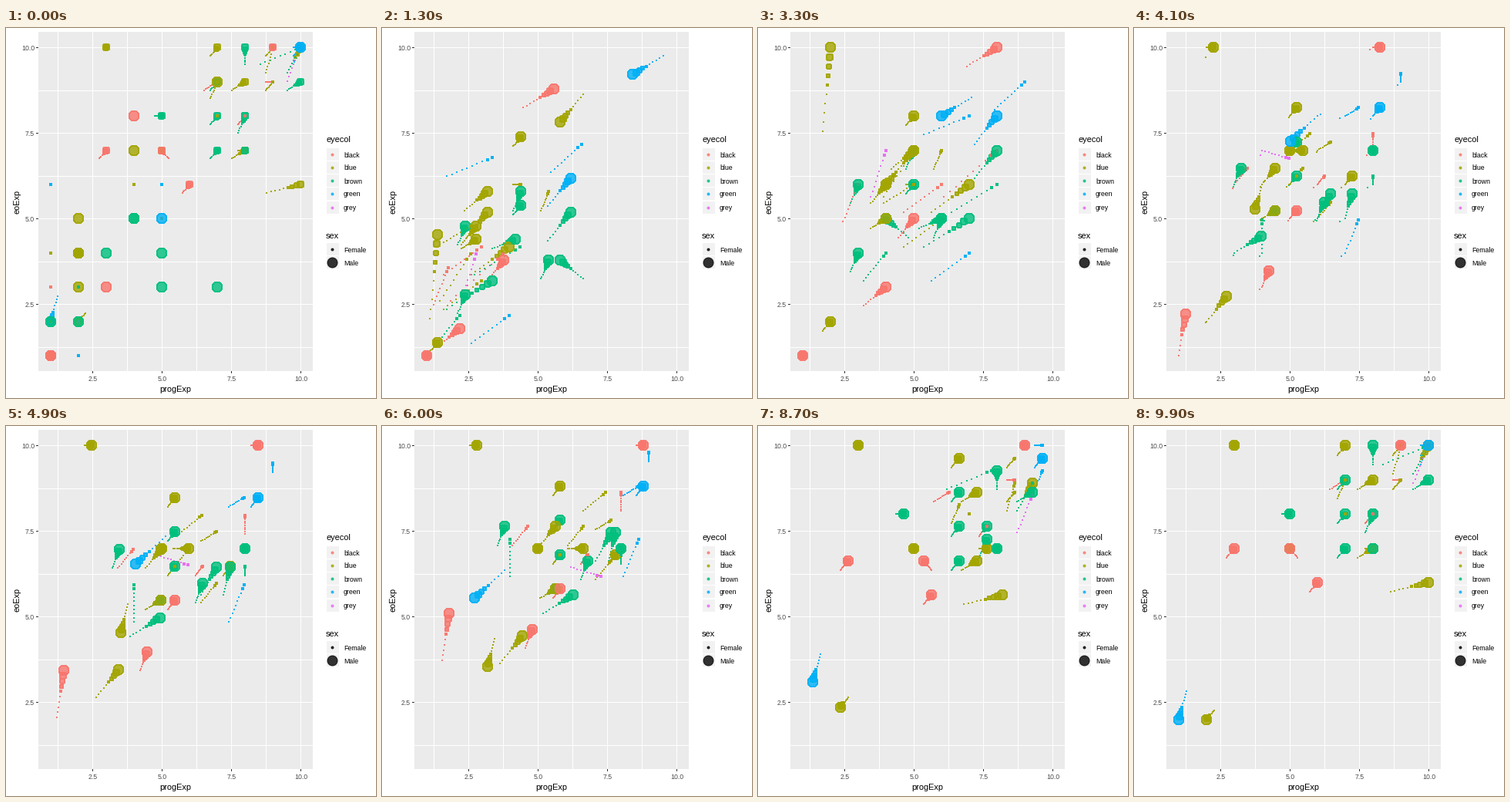
Write a matplotlib script that moves like this. It is 480 px wide and 480 px high and loops after 10000 ms.

```python
import numpy as np
import matplotlib.pyplot as plt
from matplotlib.animation import FuncAnimation
from matplotlib.patches import Rectangle

SIZE, FRAMES, STEP_MS = 480, 100, 100
WAKE = 9
FEMALE, MALE = 2, 6
ALPHA = 0.8
HUES = {"black": "#F8766D", "blue": "#A3A500", "brown": "#00BF7D",
        "green": "#00B0F6", "grey": "#E76BF3"}

plt.rcParams["font.family"] = "Liberation Sans"
fig = plt.figure(figsize=(SIZE / 72, SIZE / 72), dpi=72, facecolor="white")
ax = fig.add_axes([0, 0, 1, 1])
ax.set_xlim(0, SIZE)
ax.set_ylim(SIZE, 0)
ax.axis("off")


def px(v):
    return np.floor(22 + 36 * np.asarray(v) + 0.5)


def py(v):
    return np.floor(25.46 + 44.4 * (10 - np.asarray(v)) + 0.5)


def box(x, y, w, h, color):
    ax.add_patch(Rectangle((x, y), w, h, fc=color, lw=0, aa=False, zorder=1))


def label(x, y, s, size=8.8, color="black", **kw):
    ax.text(x, y, s, fontsize=size, color=color, va="baseline", **kw)


def radius(size):
    """Whole-pixel radius of a point of the given size in mm."""
    r = 0.375 * (size * 2.845 + 0.945)
    return np.maximum(1, np.floor(r + 0.5))


def dots(x, y, size, colors, zorder=3):
    area = (2 * radius(np.asarray(size, float)) - 1) ** 2
    return ax.scatter(x, y, s=area, c=colors, edgecolors=colors, alpha=ALPHA,
                      linewidths=1, antialiased=False, zorder=zorder)


# Panel, grid and axes
box(42, 5, 356, 440, "#EBEBEB")
for v in np.arange(1.25, 10.1, 1.25):
    box(px(v), 5, 1, 440, "white")
    box(42, py(v), 356, 1, "white")
for v in (2.5, 5.0, 7.5, 10.0):
    box(px(v), 445, 1, 3, "#333333")
    box(39, py(v), 3, 1, "#333333")
    label(px(v) + 0.5, 458, f"{v:.1f}", color="#4D4D4D", ha="center")
    label(37, py(v) + 4, f"{v:.1f}", color="#4D4D4D", ha="right")
label(220, 472, "progExp", 11, ha="center")
label(17, 225, "eoExp", 11, ha="center", rotation=90, rotation_mode="anchor")

# Legends
label(415, 148, "eyecol", 11)
for k, (name, hue) in enumerate(HUES.items()):
    y = round(163.6 + 17.28 * k)
    box(416, y - 8, 16, 16, "#F2F2F2")
    dots([423], [y], [1.5], [hue])
    label(438, y + 3.5, name)
label(415, 273, "sex", 11)
for y, name, size in ((287, "Female", FEMALE), (304, "Male", MALE)):
    box(416, y - 8, 16, 16, "#F2F2F2")
    dots([423], [y], [size], ["black"])
    label(438, y + 4, name)

# People: eye colour, sex and the place in each of four rounds, back to front
people = []


def add(eye, sex, *stops):
    people.append((HUES[eye], sex, stops))


add("grey", FEMALE, (2, 2), (4, 7), (8, 6), (10, 10))
add("black", FEMALE, (1, 2), (3, 6), (5, 8), (7, 9))
add("black", FEMALE, (1, 2), (8, 7), (8, 9), (9, 9))
add("brown", FEMALE, (1, 1), (4, 4), (4, 8), (10, 10))
add("blue", FEMALE, (5, 5), (6, 7), (8, 8), (9, 9))
add("blue", FEMALE, (1, 2), (5, 7), (8, 9), (9, 10))
add("blue", FEMALE, (1, 2), (6, 5), (8, 7), (9, 10))

add("brown", MALE, (4, 5), (5, 7), (6, 8), (7, 9))
add("brown", MALE, (4, 5), (5, 6), (6, 7), (7, 8))
add("brown", MALE, (2, 4), (3, 6), (4, 8), (5, 8))
add("brown", MALE, (5, 3), (6, 5), (7, 7), (8, 8))
add("brown", MALE, (7, 3), (4, 5), (6, 6), (7, 7))

add("blue", MALE, (7, 9), (4, 6), (6, 8), (8, 9))
add("blue", MALE, (2, 4), (4, 6), (3, 3), (2, 2))
add("blue", MALE, (4, 7), (5, 8), (6, 9), (7, 10))
add("blue", MALE, (2, 5), (5, 7), (7, 7), (8, 7))
add("blue", MALE, (2, 4), (5, 7), (5, 7), (5, 7))
add("blue", MALE, (2, 4), (4, 5), (6, 6), (8, 7))
add("blue", MALE, (2, 3), (7, 6), (8, 7), (10, 10))
add("blue", MALE, (1, 1), (2, 10), (3, 10), (3, 10))
add("blue", MALE, (1, 1), (2, 2), (5, 5), (10, 6))

add("brown", MALE, (2, 2), (3, 4), (7, 6), (8, 8))
add("brown", MALE, (3, 4), (6, 5), (8, 8), (8, 10))
add("brown", MALE, (1, 2), (7, 5), (8, 8), (10, 9))
add("brown", MALE, (5, 4), (8, 7), (8, 7), (8, 7))

add("green", MALE, (5, 5), (8, 8), (9, 9), (10, 10))
add("green", MALE, (10, 10), (6, 8), (2, 5), (1, 2))

add("black", MALE, (1, 1), (4, 3), (5, 5), (6, 6))
add("black", MALE, (1, 1), (1, 1), (2, 6), (3, 7))
add("black", MALE, (3, 3), (5, 5), (6, 6), (5, 7))
add("black", MALE, (4, 8), (8, 10), (9, 10), (9, 10))

add("black", FEMALE, (1, 3), (6, 6), (7, 7), (8, 8))
add("blue", FEMALE, (4, 6), (5, 6), (7, 8), (7, 8))
add("blue", FEMALE, (1, 4), (5, 6), (6, 7), (7, 9))
add("brown", FEMALE, (2, 3), (8, 6), (8, 7), (10, 10))
add("green", FEMALE, (1, 6), (7, 8), (9, 9), (10, 10))
add("green", FEMALE, (5, 6), (9, 9), (9, 10), (10, 10))
add("green", FEMALE, (2, 1), (7, 4), (9, 8), (10, 10))

hues = [p[0] for p in people]
sizes = np.array([p[1] for p in people], float)
stops = np.array([p[2] for p in people], float)


def places(i):
    """Pixel places of everyone at step i, moving linearly between rounds."""
    t = 3 * (i % FRAMES) / (FRAMES - 1)
    k = min(int(t), 2)
    xy = stops[:, k] + (t - k) * (stops[:, k + 1] - stops[:, k])
    return np.column_stack([px(xy[:, 0]), py(xy[:, 1])])


# The wake shrinks with the cube of its age, oldest at the back
ages = range(WAKE, -1, -1)
shrunk = np.concatenate([sizes * (1 - a / (WAKE + 1)) ** 3 for a in ages])
start = np.concatenate([places(-a) for a in ages])
cloud = dots(start[:, 0], start[:, 1], shrunk, hues * (WAKE + 1), zorder=4)


def update(i):
    cloud.set_offsets(np.concatenate([places(i - a) for a in ages]))
    return cloud,


anim = FuncAnimation(fig, update, frames=FRAMES, interval=STEP_MS,
                     repeat=True, repeat_delay=0)
plt.show()
```
